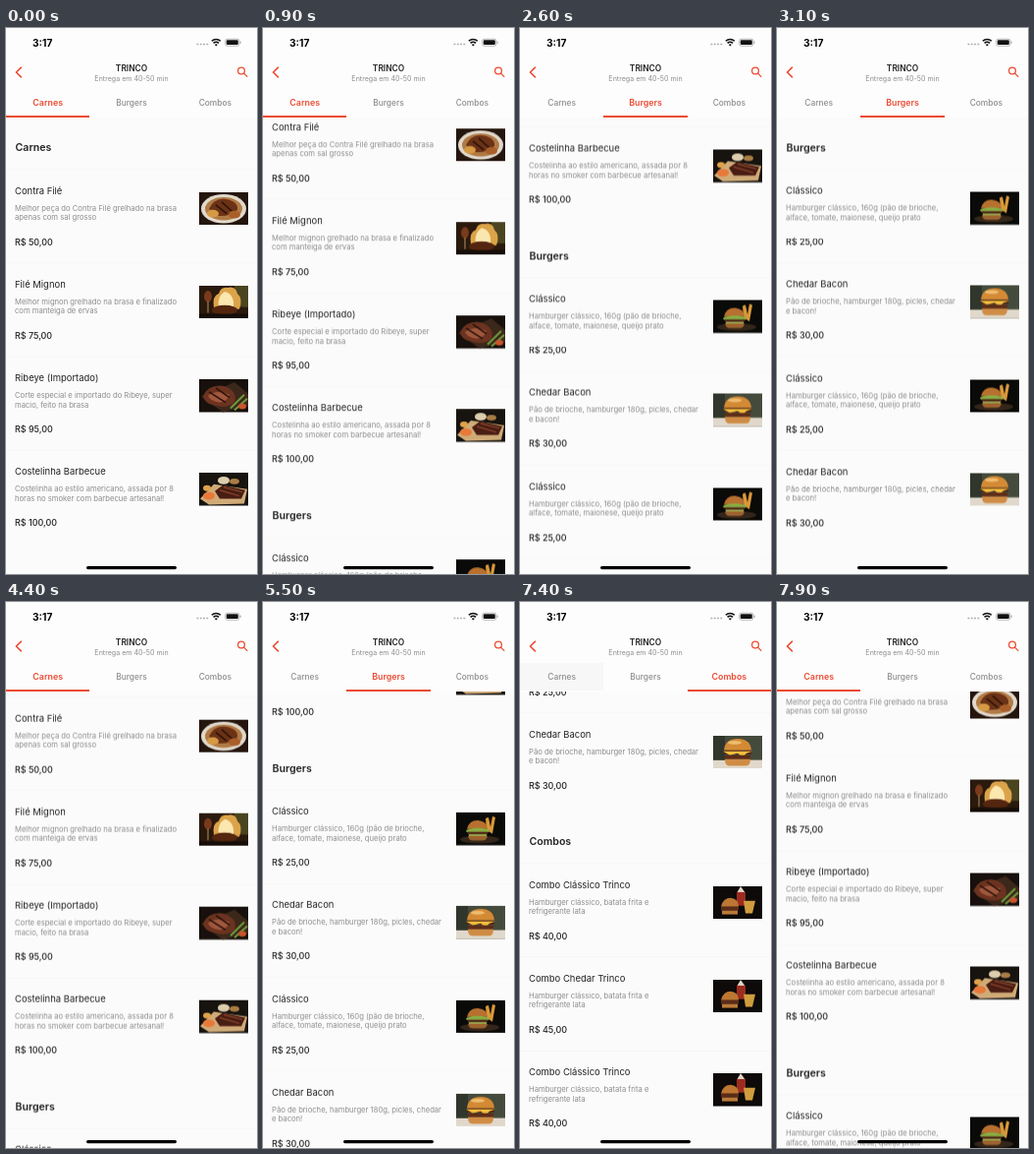
An HTML page that plays this animation: 256 by 555 pixels, repeating every 8000 ms.

```html
<!DOCTYPE html>
<html lang="pt-BR">
<head>
<meta charset="utf-8">
<title>Menu</title>
<style>
  :root { --bg: #fdfdfd; --ink: #222; --soft: #8d8d8f; --accent: #ec4b33; }
  html, body { margin: 0; width: 100%; height: 100%; overflow: hidden; background: var(--bg); }
  body { position: relative; font-family: Inter, Roboto, sans-serif; color: var(--ink); }
  #stage { position: absolute; left: 0; top: 0; width: 256px; height: 555px; overflow: hidden; }
  #stage div { position: absolute; white-space: nowrap; }
  .mid { transform: translate(-50%, -50%); }
  #clock { left: 37.2px; top: 15px; font-size: 10.2px; font-weight: 700; color: #000; }
  #name { left: 128px; top: 41px; font-size: 8.4px; font-weight: 600; }
  #delivery { left: 128px; top: 50.5px; font-size: 7.1px; color: var(--soft); }
  .chrome { position: absolute; left: 0; top: 0; }
  .tab { top: 62px; width: 85.33px; height: 28px; line-height: 28px; text-align: center; font-size: 8.4px; font-weight: 500; color: var(--soft); }
  .tab.active { font-size: 8.85px; font-weight: 600; color: var(--accent); }
  .tab.pressed { background: #f7f7f7; }
  #underline { left: 0; top: 89.4px; width: 85.33px; height: 1.4px; background: var(--accent); }
  #view { left: 0; top: 91px; width: 256px; height: 464px; overflow: hidden; background: #fbfbfb; }
  #list { left: 0; top: -91px; width: 256px; will-change: transform; }
  .heading { left: 9.5px; height: 14px; line-height: 14px; margin-top: -7px; font-size: 10.6px; font-weight: 600; }
  .item { left: 0; width: 256px; height: 95px; }
  .item::before { content: ""; position: absolute; top: -22px; width: 100%; height: 1px; background: #f7f7f5; }
  .item div { left: 9px; }
  .item .title { top: -5.5px; line-height: 12px; font-size: 9.45px; }
  .item .text { top: 13.5px; line-height: 9.5px; font-size: 7.65px; color: var(--soft); }
  .item .price { top: 46.5px; line-height: 12px; font-size: 8.95px; font-weight: 500; }
  .item svg { position: absolute; left: 197px; top: 1.5px; }
</style>
</head>
<body>
<div id="stage">
  <div id="view"><div id="list"></div></div>
  <div id="clock" class="mid">3:17</div>
  <div id="name" class="mid">TRINCO</div>
  <div id="delivery" class="mid">Entrega em 40-50 min</div>
  <div id="tabs"></div>
  <div id="underline"></div>
  <svg class="chrome" width="256" height="555" fill="none">
    <path d="M194.5 16.5h12" stroke="#aaa" stroke-width="1.5" stroke-dasharray="1.8 1.5"/>
    <path d="M209.8 13.3a6.4 6.4 0 0 1 9 0M211.6 15.4a3.9 3.9 0 0 1 5.4 0" stroke="#111" stroke-width="1.6"/>
    <path d="M214.3 18.6l-1.5-1.7a2.2 2.2 0 0 1 3 0z" fill="#111"/>
    <rect x="223.7" y="11.2" width="14.2" height="7" rx="2" stroke="#999" stroke-width=".7"/>
    <rect x="224.8" y="12.3" width="12" height="4.8" rx="1.1" fill="#111"/>
    <path d="M239 13.6v2.2" stroke="#999"/>
    <g stroke="var(--accent)" stroke-width="1.6" stroke-linecap="round" stroke-linejoin="round">
      <path d="M15.4 40.2L10.4 45l5 4.8"/>
      <g stroke-width="1.3">
        <circle cx="240" cy="43.5" r="3.4"/>
        <path d="M242.6 46.1l3.3 3.3"/>
      </g>
    </g>
    <rect x="82" y="547" width="92" height="3.2" rx="1.6" fill="#000"/>
  </svg>
</div>
<script>
const rect = (x, y, w, h, fill) => `<rect x="${x}" y="${y}" width="${w}" height="${h}" fill="${fill}"/>`;
const oval = (x, y, rx, ry, fill) => `<ellipse cx="${x}" cy="${y}" rx="${rx}" ry="${ry}" fill="${fill}"/>`;
const path = (d, fill) => `<path d="${d}" fill="${fill}"/>`;
const line = (d, color, width) => `<path d="${d}" fill="none" stroke="${color}" stroke-width="${width}"/>`;

const photos = {
  steak: rect(0, 0, 50, 34, '#24150d') + oval(25, 17, 23, 15, '#e0d8cb') + oval(25, 17, 19, 12, '#b07a45') +
    path('M10 17Q15 6 27 7Q40 9 39 18Q30 26 18 24Z', '#6b3216') +
    line('M17 13l11 9M23 10l11 10', '#2b140a', 1.5) + oval(14, 22, 6, 4, '#d69a45') + oval(36, 23, 6, 4, '#a85f2a'),
  grill: rect(0, 0, 50, 34, '#2a190d') + rect(36, 0, 14, 22, '#4a4520') +
    path('M15 23Q13 10 20 8Q22 1 29 2Q37 0 39 8Q45 13 41 24Z', '#dca44a') +
    path('M20 22Q18 11 26 6Q36 8 35 22Z', '#fbe7b0') + oval(9, 11, 4, 6, '#7a3a1c') +
    line('M9 16v12', '#b8935f', 1) + oval(26, 25, 13, 5, '#54260f') + rect(0, 29, 50, 5, '#150d08'),
  ribeye: rect(0, 0, 50, 34, '#17100c') + path('M2 18L36 3L50 15V28L24 34Z', '#3c281b') +
    path('M4 17Q10 5 25 7Q40 12 36 24Q28 31 15 27Q5 25 4 17Z', '#6b3320') +
    path('M9 17Q18 10 31 16Q29 23 21 24Q11 23 9 17Z', '#a0573c') + line('M10 13l17 11M17 9l14 10', '#2a130c', 1.6) +
    line('M32 30L46 16M36 32L49 20', '#6d9a3c', 2) + oval(44, 28, 4, 3, '#c9542d'),
  ribs: rect(0, 0, 50, 34, '#17130f') + path('M1 27L15 12L49 17L46 32L10 33Z', '#d0ab78') +
    path('M16 19L24 13L47 18L43 27L21 27Z', '#481d13') + line('M21 18l20 6M25 15l19 5', '#84402a', 1.4) +
    oval(25, 8, 6, 4, '#dccdae') + oval(10, 24, 6, 4, '#e8793a') + oval(8, 16, 4, 3, '#e0a24a') + oval(36, 9, 5, 3, '#a97d45'),
  classic: rect(0, 0, 50, 34, '#0a0a08') + oval(24, 28, 20, 4, '#34261a') +
    path('M31 18L30 6L33 5L35 15L37 4L40 5L37 22Z', '#d9993a') + path('M11 17Q13 8 22 8Q32 9 32 17Z', '#b8702f') +
    oval(22, 19, 12, 3, '#89ad43') + rect(12, 20, 20, 3, '#512919') + rect(13, 22.5, 18, 2, '#9fb555') +
    path('M12 24H32Q31 29 27 29H17Q13 29 12 24Z', '#9c632f'),
  cheddar: rect(0, 0, 50, 34, '#454b3c') + rect(0, 25, 50, 9, '#e0d8ca') + rect(0, 0, 12, 25, '#30362c') +
    path('M11 15Q12 3 25 3Q38 3 39 15Z', '#d48a35') + oval(22, 7, 7, 2, '#eebd70') +
    rect(11, 15, 28, 4, '#4f2616') + path('M10 16H40L34 18L30 22L25 18L17 20Z', '#f3bd3c') +
    rect(12, 20, 26, 4, '#5f2c18') + path('M12 24H38Q38 31 33 31H17Q12 31 12 24Z', '#cf8c45'),
  combo: rect(0, 0, 50, 34, '#0d0a09') + path('M24 7L28 0L33 7Z', '#e5d6c8') + rect(24, 6, 9, 14, '#9c2c20') +
    path('M8 21Q10 12 18 12Q26 13 26 21Z', '#bd7732') + rect(8, 21, 18, 4, '#5b2b19') +
    rect(9, 25, 16, 4, '#b97938') + path('M33 28L31 15H43L40 28Z', '#cf9d3d')
};

const classic = ['Clássico', 'Hamburger clássico, 160g (pão de brioche,<br>alface, tomate, maionese, queijo prato', '25,00', 'classic'];
const cheddar = ['Chedar Bacon', 'Pão de brioche, hamburger 180g, picles, chedar<br>e bacon!', '30,00', 'cheddar'];
const comboText = 'Hamburger clássico, batata frita e<br>refrigerante lata';
const sections = [
  ['Carnes', [
    ['Contra Filé', 'Melhor peça do Contra Filé grelhado na brasa<br>apenas com sal grosso', '50,00', 'steak'],
    ['Filé Mignon', 'Melhor mignon grelhado na brasa e finalizado<br>com manteiga de ervas', '75,00', 'grill'],
    ['Ribeye (Importado)', 'Corte especial e importado do Ribeye, super<br>macio, feito na brasa', '95,00', 'ribeye'],
    ['Costelinha Barbecue', 'Costelinha ao estilo americano, assada por 8<br>horas no smoker com barbecue artesanal!', '100,00', 'ribs']
  ]],
  ['Burgers', [classic, cheddar, classic, cheddar]],
  ['Combos', [
    ['Combo Clássico Trinco', comboText, '40,00', 'combo'],
    ['Combo Chedar Trinco', comboText, '45,00', 'combo'],
    ['Combo Clássico Trinco', comboText, '40,00', 'combo']
  ]]
];

const SECTION = 438.5, ROW = 95.3, TAB = 256 / 3, LOOP = 8000, STEP = 100;

const itemHtml = ([title, text, price, photo], y) => `<div class="item" style="top:${y}px">
  <div class="title">${title}</div><div class="text">${text}</div><div class="price">R$ ${price}</div>
  <svg width="50" height="33.5" viewBox="0 0 50 34" preserveAspectRatio="none">${photos[photo]}</svg></div>`;

const byId = id => document.getElementById(id);
const list = byId('list'), underline = byId('underline');
list.innerHTML = sections.map(([name, items], k) =>
  `<div class="heading" style="top:${122 + k * SECTION}px">${name}</div>` +
  items.map((item, i) => itemHtml(item, 165 + k * SECTION + i * ROW)).join('')).join('');
byId('tabs').innerHTML = sections.map(([name], k) =>
  `<div class="tab" style="left:${k * TAB}px">${name}</div>`).join('');
const tabs = [...document.querySelectorAll('.tab')];

// Finger drag, as time and offset pairs.
const drag = [[400, 0], [1500, 142.5], [2600, 328.5], [3100, SECTION]];
// Tab taps: finger down, scroll start, tab, offset reached.
const taps = [
  [3900, 4063, 0, 0],
  [4900, 5163, 1, SECTION],
  [6000, 6263, 2, 755],
  [7400, 7563, 0, 0]
];
// Tab changes: the drag reaches the burgers, then each tap.
const switches = [[1950, 1], ...taps.map(([, start, tab]) => [start, tab])];
const SCROLL_MS = 439, SLIDE_MS = 180;

const ease = u => u < 0.5 ? 2 * u * u : 1 - 2 * (1 - u) ** 2;
const progress = (t, start, length) => Math.min(1, Math.max(0, (t - start) / length));

function stateAt(t) {
  let offset = 0, active = 0, slide = 0, pressed = -1;
  for (let i = 1; i < drag.length; i++) {
    const [t0, y0] = drag[i - 1], [t1, y1] = drag[i];
    offset += (y1 - y0) * progress(t, t0, t1 - t0);
  }
  for (const [down, start, tab, goal] of taps) {
    if (t >= down && t < start + 237) pressed = tab;
    offset += (goal - offset) * ease(progress(t, start, SCROLL_MS));
  }
  for (const [start, tab] of switches) {
    if (t >= start) active = tab;
    slide += (tab - slide) * ease(progress(t, start, SLIDE_MS));
  }
  return { offset, active, slide, pressed };
}

function draw(now) {
  const t = Math.floor((now % LOOP) / STEP) * STEP;
  const { offset, active, slide, pressed } = stateAt(t);
  list.style.transform = `translateY(${-offset}px)`;
  underline.style.left = `${slide * TAB}px`;
  tabs.forEach((tab, k) => {
    tab.classList.toggle('active', k === active);
    tab.classList.toggle('pressed', k === pressed);
  });
}

let origin;
function tick(now) {
  origin ??= now;
  draw(now - origin);
  requestAnimationFrame(tick);
}
draw(0);
requestAnimationFrame(tick);
</script>
</body>
</html>
```
